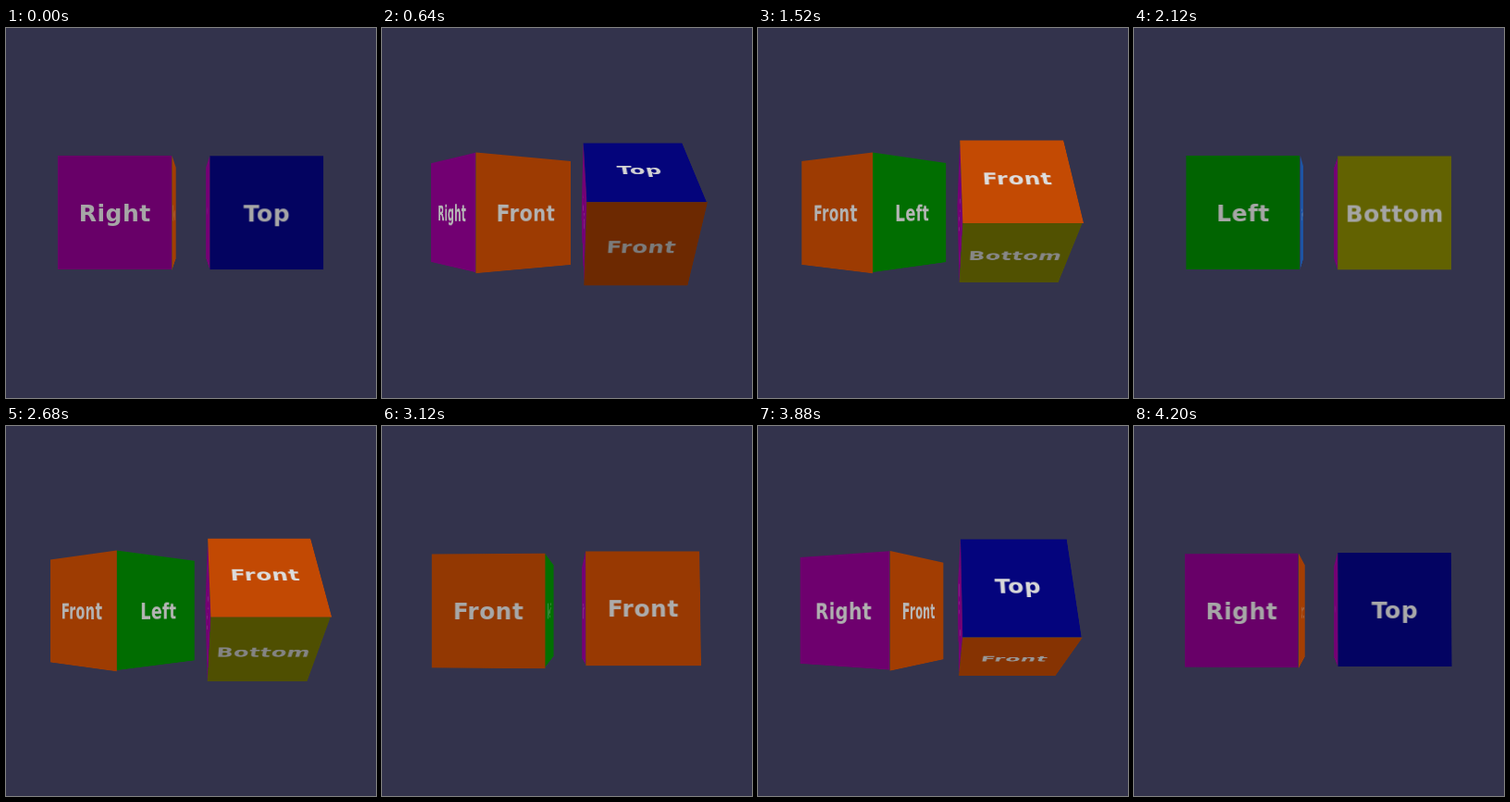
An HTML page that plays this animation: 400 by 400 pixels, repeating every 4240 ms.

```html
<!DOCTYPE html>
<html lang="en">
<head>
<meta charset="utf-8">
<title>Two turning cubes</title>
<style>
  html, body { margin: 0; width: 100%; height: 100%; overflow: hidden; background: #33334c; }
  #stage {
    position: absolute; left: 0; top: 0; width: 400px; height: 400px;
    overflow: hidden; perspective: 482.84px; perspective-origin: 200px 200.4px;
  }
  .cube { position: absolute; left: 200px; top: 200.4px; width: 0; height: 0; transform-style: preserve-3d; }
  .face {
    position: absolute; left: -61.7px; top: -61.7px; width: 123.4px; height: 123.4px;
    backface-visibility: hidden; text-align: center; white-space: nowrap;
    font: bold 25px/126px "DejaVu Sans", Verdana, sans-serif; letter-spacing: 0.5px;
  }
</style>
</head>
<body>
<div id="stage"></div>
<script>
const LOOP = 4240;
const HALF = 61.7;
const OFFSET = 82.25;

// Swing angle in degrees at a few times; straight lines between them.
const SWING = [[0, 90], [40, 89.8], [2118, -90], [4186, 90], [LOOP, 85.3]];

// Normals use y upwards, z towards the viewer.
const FACES = [
  { name: 'Front',  color: [225, 85, 3],   normal: [0, 0, 1],  turn: 'rotateY(0deg)' },
  { name: 'Back',   color: [40, 115, 225], normal: [0, 0, -1], turn: 'rotateY(180deg)' },
  { name: 'Right',  color: [160, 0, 160],  normal: [-1, 0, 0], turn: 'rotateY(-90deg)' },
  { name: 'Left',   color: [2, 154, 2],    normal: [1, 0, 0],  turn: 'rotateY(90deg)' },
  { name: 'Top',    color: [5, 5, 148],    normal: [0, 1, 0],  turn: 'rotateX(90deg)' },
  { name: 'Bottom', color: [152, 152, 2],  normal: [0, -1, 0], turn: 'rotateX(-90deg)' }
];

const stage = document.getElementById('stage');

function addElement(parent, className) {
  const element = document.createElement('div');
  element.className = className;
  return parent.appendChild(element);
}

function makeCube(x, axis, sign) {
  const element = addElement(stage, 'cube');
  const sides = FACES.map(face => {
    const side = addElement(element, 'face');
    side.textContent = face.name;
    side.style.transform = `${face.turn} translateZ(${HALF}px)`;
    return side;
  });
  return { element, sides, x, axis, sign };
}

const cubes = [makeCube(-OFFSET, 'Y', 1), makeCube(OFFSET, 'X', -1)];

function swingAt(time) {
  const i = SWING.findIndex(([end]) => time < end);
  const [t0, a0] = SWING[i - 1], [t1, a1] = SWING[i];
  return a0 + (a1 - a0) * (time - t0) / (t1 - t0);
}

function rotate([x, y, z], axis, degrees) {
  const r = degrees * Math.PI / 180, c = Math.cos(r), s = Math.sin(r);
  return axis === 'Y' ? [x * c + z * s, y, z * c - x * s]
                      : [x, y * c + z * s, z * c - y * s];
}

// Light from above and in front, slightly stronger on faces turned away.
function brightness([x, y, z]) {
  return 0.65 + 0.08 * Math.abs(x) + 0.04 * Math.abs(y) + 0.5 * y * z * z;
}

const shade = (color, light, alpha = 1) =>
  `rgba(${color.map(v => Math.round(v * light)).join(',')},${alpha.toFixed(3)})`;

// Labels blur into faces seen edge-on.
const labelAlpha = z => Math.min(1, 0.2 + 3 * Math.max(0, z));

function draw(time) {
  const swing = swingAt(time);
  for (const { element, sides, x, axis, sign } of cubes) {
    const angle = sign * swing;
    element.style.transform = `translate3d(${x}px, 0, ${-HALF}px) rotate${axis}(${angle}deg)`;
    sides.forEach((side, i) => {
      const normal = rotate(FACES[i].normal, axis, angle);
      const light = brightness(normal);
      side.style.backgroundColor = shade(FACES[i].color, light);
      side.style.color = shade([255, 255, 255], light, labelAlpha(normal[2]));
    });
  }
}

function tick() {
  draw(performance.now() % LOOP);
  requestAnimationFrame(tick);
}
tick();
</script>
</body>
</html>
```
